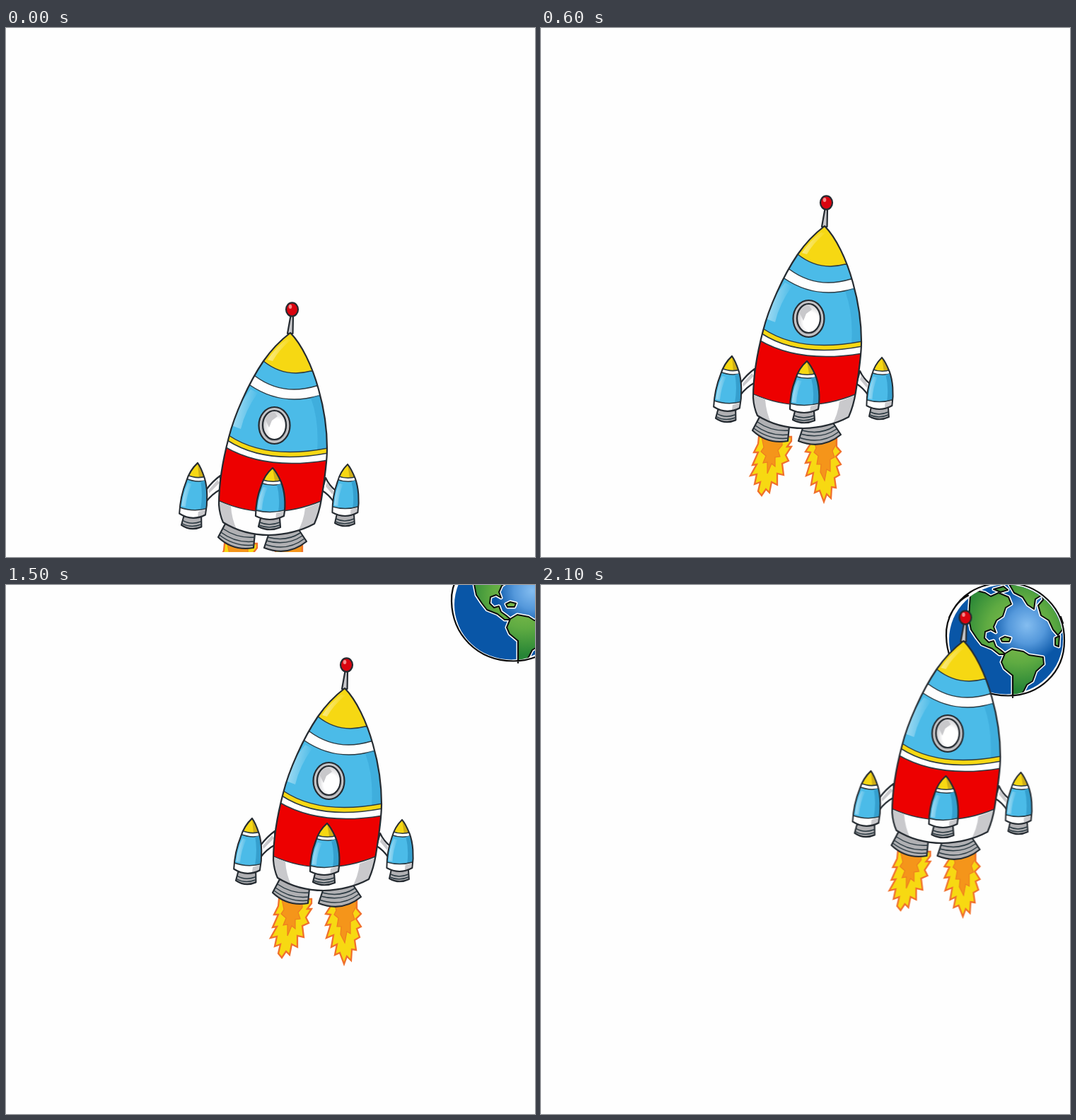
An HTML page that plays this animation: 748 px wide and 748 px high, repeating every 2.4 s.

```html
<!DOCTYPE html>
<html lang="en">
<head>
<meta charset="utf-8">
<title>Rocket launch</title>
<style>
  html, body { margin: 0; width: 100%; height: 100%; overflow: hidden; background: #fefefe; }
  svg { display: block; width: 100vw; height: 100vh; }
  .ink { stroke: #252b31; stroke-width: 2.2; stroke-linejoin: round; stroke-linecap: round; }
  .band { stroke: #2b3a42; stroke-width: 1.5; }
  .none { fill: none; }
  .blue { fill: #4bbbe8; }
  .yellow { fill: #f6d813; }
  .red { fill: #ed0000; }
  .white { fill: #fefefe; }
  .steel { fill: #b0b0b3; }
  .shade { fill: #c9c9cc; }
  .fire { fill: #f7d912; stroke: #f0702c; stroke-width: 2.3; stroke-linejoin: miter; }
  .core { fill: #f5951a; stroke: #ee7c20; stroke-width: 1.2; }

  .rocket { animation: fly 2400ms step-end infinite; }
  #earth { animation: approach 2400ms step-end infinite; }
  @keyframes fly {
    0% { transform: translate(1px, 151px); }
    12.5% { transform: translate(0, 63px); }
    25% { transform: translate(0, 0); }
    37.5% { transform: translate(0, -50px); }
    50% { transform: translate(38px, -92px); }
    62.5% { transform: translate(78px, -134px); }
    75% { transform: translate(128px, -172px); }
    87.5%, 100% { transform: translate(196.5px, -201px); }
  }
  @keyframes approach {
    0% { transform: translate(200px, -200px); }
    37.5% { transform: translate(97px, -92px); }
    50% { transform: translate(76px, -70px); }
    62.5% { transform: translate(57px, -49px); }
    75% { transform: translate(34px, -28px); }
    87.5%, 100% { transform: translate(0, 0); }
  }
</style>
</head>
<body>
<svg viewBox="0 0 748 748">
  <defs>
    <clipPath id="ground"><path d="M0 0H748V741H0Z"/></clipPath>
    <radialGradient id="sea" gradientUnits="userSpaceOnUse" cx="687" cy="57" r="52">
      <stop offset="0" stop-color="#84bdf0"/><stop offset=".5" stop-color="#5498db"/>
      <stop offset="1" stop-color="#0956a7"/>
    </radialGradient>
    <radialGradient id="land" gradientUnits="userSpaceOnUse" cx="676" cy="64" r="84">
      <stop offset="0" stop-color="#8cc24e"/><stop offset=".55" stop-color="#5fab42"/>
      <stop offset="1" stop-color="#278536"/>
    </radialGradient>
    <radialGradient id="glass" cx=".6" cy=".62" r=".65">
      <stop offset=".5" stop-color="#fff"/><stop offset="1" stop-color="#c4c4c8"/>
    </radialGradient>
    <linearGradient id="sheen" x1="0" y1="0" x2="1" y2=".25">
      <stop offset="0" stop-color="#fff" stop-opacity=".6"/><stop offset="1" stop-color="#fff" stop-opacity="0"/>
    </linearGradient>

    <path id="hull" d="M401 280C384 293 372 307 363 320C342 351 322 396 314 428C305 462 300 492 300 523Q301 537 306 548Q335 566 371 566Q407 565 435 550Q442 534 445 515C449 490 453 465 453 444C453 412 447 381 441 360C432 327 417 296 401 280Z"/>
    <clipPath id="hullClip"><use href="#hull"/></clipPath>

    <path id="pod" d="M0 0C-8 7-13 15-16 25C-22 40-24 55-24 68Q-4 78 16 68C19 51 17 32 12 20C8 11 4 4 0 0Z"/>
    <clipPath id="podClip"><use href="#pod"/></clipPath>
    <g id="booster">
      <path class="steel ink" d="M-17 71L-20 83Q-5 91 11 84L10 71Z"/>
      <path class="band none" d="M-18 77Q-5 83 10 77M-19 81Q-5 87 10 81"/>
      <g clip-path="url(#podClip)">
        <path class="yellow" d="M-30-5H30V40H-30Z"/>
        <path d="M0 0L14 24H4Z" fill="#cfae16"/>
        <path class="white band" d="M-17 16Q0 22 14 17L30 90H-30Z"/>
        <path class="blue band" d="M-18 21Q0 27 16 22L30 90H-30Z"/>
        <path d="M6 24Q11 42 8 62L24 60V20Z" fill="#359fce"/>
        <path d="M-13 27L-7 28Q-14 42-15 59L-21 58Q-20 40-13 27Z" fill="url(#sheen)"/>
        <path class="white band" d="M-27 59Q-4 66 20 59L30 90H-30Z"/>
        <path class="shade" d="M5 64L20 60V75H4Z"/>
      </g>
      <use href="#pod" class="ink none"/>
    </g>

    <g id="coast">
      <path d="M607 15L616 8L628 11L636 16L647 11L661 17L665 27L657 32L653 44L644 50L640 59L643 67L636 63L628 66L627 75L633 81L640 79L643 87L650 92L657 98L648 98L638 90L623 84L616 75L608 63L605 48L606 29Z"/>
      <path d="M640 6L654 2L660 7L650 10Z"/>
      <path d="M662 -1L681 0L702 4L707 15L699 20L697 34L688 28L681 17L669 11Z"/>
      <path d="M707 6L722 20L734 42L738 62L731 71L724 63L718 50L707 43L703 29L710 21Z"/>
      <path d="M650 76L656 73L664 75L662 80L652 80Z"/>
      <path d="M727 75L733 72L732 87L727 85Z"/>
      <path d="M656 97L666 91L682 94L690 99L710 102L711 112L700 122L695 136L687 141L683 149L678 157H667V128L655 118L651 109Z"/>
    </g>
    <clipPath id="globeClip"><ellipse cx="657" cy="77.5" rx="81" ry="78"/></clipPath>
  </defs>

  <g id="earth">
    <ellipse cx="657" cy="77.5" rx="83.5" ry="80" class="white"/>
    <ellipse cx="657.5" cy="77" rx="80.5" ry="77.5" fill="url(#sea)"/>
    <g clip-path="url(#globeClip)" stroke-linejoin="round">
      <use href="#coast" fill="none" stroke="#fff" stroke-width="5"/>
      <use href="#coast" fill="url(#land)" stroke="#0c0f0c" stroke-width="2"/>
    </g>
    <path class="none" stroke="#0a0a0a" stroke-width="2.2" stroke-linecap="round"
      d="M607 10C587 23 572 46 573 72C574 119 609 156 660 156.5C704 157 740 124 740 79C741 33 704-3 657-3C638-3 621 1 607 10M577 46Q588 22 604 15M667 128V159M735 45L738 54"/>
  </g>

  <g clip-path="url(#ground)">
    <g class="rocket">
      <path class="fire" d="M308 578L307 588L301 600L307 600L299 618L305 617L296 633L305 631L302 645L310 642L307 655L312 661L318 652L323 657L326 642L334 646L334 630L343 632L341 616L350 612L346 604L354 592L348 592L354 584V578Z"/>
      <path class="core" d="M312 578L315 593L311 599L318 605L314 615L320 614L320 630L326 616L331 620L331 607L338 606L335 597L341 590V578Z"/>
      <path class="fire" d="M378 580L381 588L374 599L381 600L374 615L381 614L375 633L385 629L382 646L390 642L387 657L394 654L400 670L404 659L410 665L411 649L417 650L415 636L422 632L418 620L424 617L417 606L424 599L418 592V580Z"/>
      <path class="core" d="M385 580L389 594L386 600L392 605L390 617L396 617L395 628L401 640L404 624L409 627L409 610L415 607L412 598L417 589V580Z"/>
    </g>
  </g>

  <g class="rocket">
    <g class="ink">
      <path class="steel" d="M309 550L299 569Q320 589 349 584L351 563Z"/>
      <path class="steel" d="M371 563L364 584Q397 597 424 575L412 557Z"/>
      <path class="white" d="M302 482Q291 490 282 502V519Q290 508 303 501Z"/>
      <path class="white" d="M451 485Q456 496 465 503L463 520Q456 509 446 503Z"/>
    </g>
    <path class="band none" d="M306 557Q326 571 351 569M303 562Q324 578 350 575M301 566Q323 583 350 580M369 569Q395 576 415 563M367 574Q396 582 418 567M365 579Q396 590 421 571"/>
    <path class="shade" d="M298 488L301 492L286 507L285 503ZM453 491L462 504L461 509L451 497Z"/>

    <path class="shade ink" d="M397 281L401.5 256H405L404.5 281Z"/>
    <ellipse class="ink" cx="403.5" cy="247" rx="8.5" ry="9.6" fill="#d9040f"/>
    <ellipse cx="401" cy="243" rx="2.3" ry="3" fill="#f58a8a"/>

    <g clip-path="url(#hullClip)">
      <path class="yellow" d="M280 270H470V360H280Z"/>
      <path d="M396 289L402 290Q385 304 376 320L369 318Q380 301 396 289Z" fill="url(#sheen)"/>
      <path class="blue band" d="M363 320Q393 344 430 334L475 340V600H270V320Z"/>
      <path class="white band" d="M351 341Q390 370 438 355L475 360V600H270V341Z"/>
      <path class="blue band" d="M344 354Q388 384 441 369L475 370V600H270V354Z"/>
      <path d="M345 360L355 365Q337 390 331 416L318 411Q327 382 345 360Z" fill="url(#sheen)"/>
      <path d="M430 372Q442 405 439 446H460V361Z" fill="#35a5d5" opacity=".55"/>
      <path class="yellow band" d="M314 425Q366 460 454 443L475 442V600H270V425Z"/>
      <path class="white band" d="M312 432Q366 467 454 450L475 448V600H270V432Z"/>
      <path class="red band" d="M308 441Q366 475 454 460L475 458V600H270V441Z"/>
      <path class="white band" d="M299 517Q370 549 447 517L475 515V600H270V517Z"/>
      <path class="shade" d="M300 519L317 525Q318 543 326 560L300 552ZM422 528L446 519L437 552L411 562Q420 546 422 528Z"/>
    </g>
    <use href="#hull" class="ink none"/>

    <ellipse class="steel ink" cx="378.5" cy="411" rx="22" ry="26"/>
    <ellipse cx="378.5" cy="411" rx="19.5" ry="23.5" fill="none" stroke="#c6c6c9" stroke-width="2"/>
    <ellipse class="ink" cx="378.5" cy="410.5" rx="16.5" ry="20.5" fill="url(#glass)"/>
    <path d="M366 403Q369 392 379 393L383 398L375 404L371 414Z" fill="#c8c8cb"/>

    <use href="#booster" transform="translate(270 464) rotate(3) scale(.92 1.07)"/>
    <use href="#booster" transform="translate(376 471)"/>
    <use href="#booster" transform="translate(482 466) scale(.9 1)"/>
  </g>
</svg>
</body>
</html>
```
